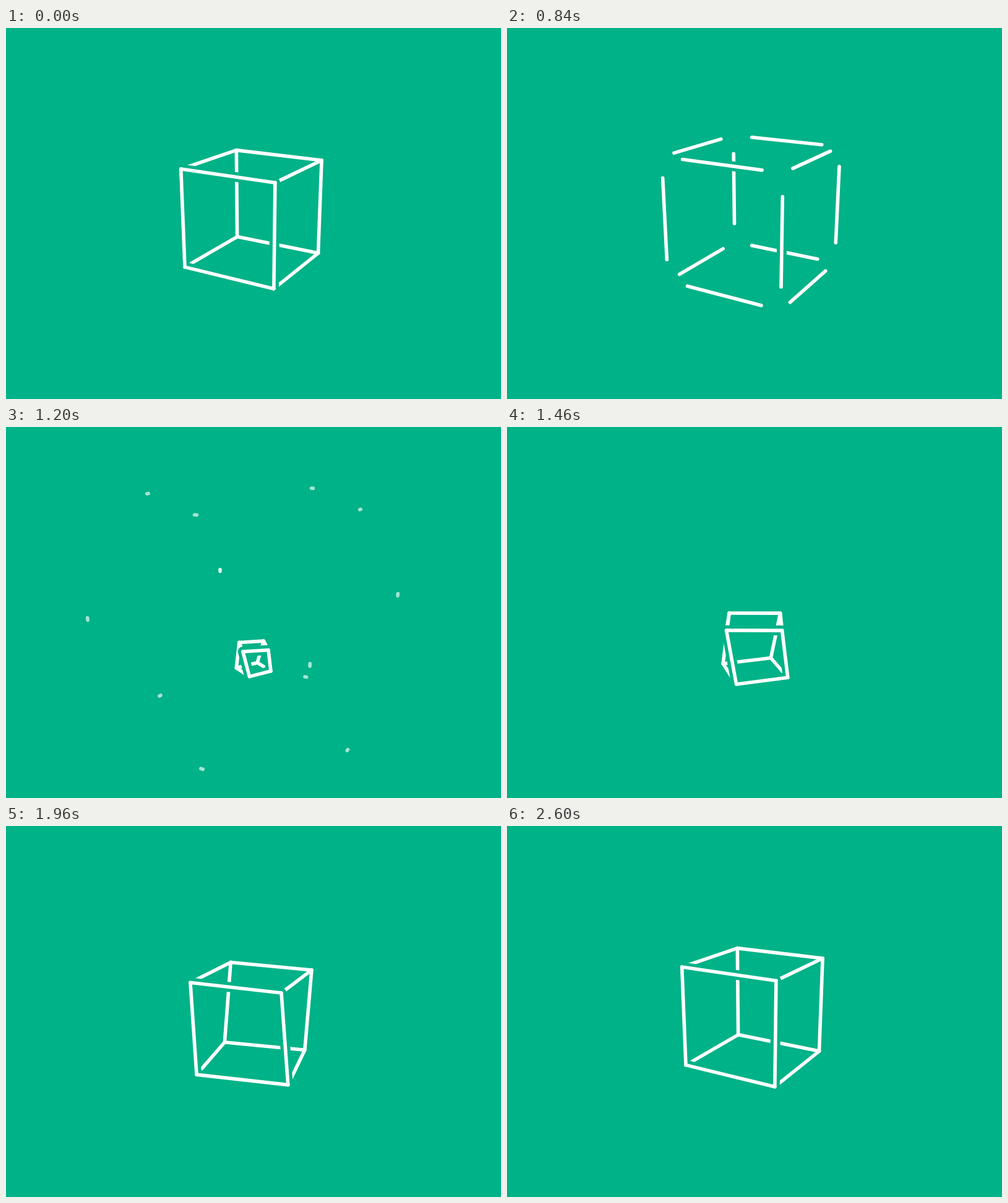
These frames come from a looping animation (800x600 px, 2.72 s). An HTML page with a canvas:

```html
<!DOCTYPE html>
<html lang="en">
<head>
<meta charset="utf-8">
<title>Cube burst</title>
<style>
  html, body { margin: 0; width: 100%; height: 100%; overflow: hidden; background: #00b287; }
  canvas { display: block; width: 800px; height: 600px; }
</style>
</head>
<body>
<canvas id="stage" width="800" height="600"></canvas>
<script>
const ctx = document.getElementById('stage').getContext('2d');
const LOOP = 2720, GREEN = '#00b287';
const HALF = 81, DEPTH = 930, TURN = 29.8, RAD = Math.PI / 180;
const TILT_COS = Math.cos(18 * RAD), TILT_SIN = Math.sin(18 * RAD);
const LINE = 5.6, HALO = 16;

// Corners: top face 0-3 from front left, bottom face 4-7 below them.
const CORNERS = [[-1, 1], [1, 1], [1, -1], [-1, -1]];
const BACK = [[3, 0], [1, 2], [2, 3], [2, 6], [3, 7], [7, 4], [5, 6], [6, 7]];
const FRONT = [[0, 1], [1, 5], [5, 4], [4, 0]];

const part = (t, from, to) => Math.min(1, Math.max(0, (t - from) / (to - from)));
const sineInOut = x => (1 - Math.cos(Math.PI * x)) / 2;
const sineOut = x => Math.sin(Math.PI * x / 2);

// Top and bottom faces have their own turn, which twists the cube.
function project(scale, topTurn, bottomTurn, drop) {
  const points = [];
  for (const [y, turn] of [[-1, topTurn], [1, bottomTurn]]) {
    const c = Math.cos(turn * RAD), s = Math.sin(turn * RAD), size = HALF * scale;
    for (const [x, z] of CORNERS) {
      const depth = x * s + z * c;
      const near = DEPTH / (DEPTH - size * (depth * TILT_COS - y * TILT_SIN));
      points.push([
        400 + size * (x * c - z * s) * near,
        300 + (size * (y * TILT_COS + depth * TILT_SIN) + drop) * near
      ]);
    }
  }
  return points;
}

// Keeps the middle share of an edge.
function segment(points, [i, j], share) {
  const a = points[i], b = points[j], k = (1 - share) / 2;
  const dx = (b[0] - a[0]) * k, dy = (b[1] - a[1]) * k;
  return [a[0] + dx, a[1] + dy, b[0] - dx, b[1] - dy];
}

function stroke([x1, y1, x2, y2], color, width) {
  ctx.strokeStyle = color;
  ctx.lineWidth = width;
  ctx.beginPath();
  ctx.moveTo(x1, y1);
  ctx.lineTo(x2, y2);
  ctx.stroke();
}

function drawCube(points, share = 1, alpha = 1) {
  const white = a => `rgba(255,255,255,${a})`;
  for (const edge of BACK) {
    const rear = edge[0] === 3 && edge[1] === 7;
    stroke(segment(points, edge, share), white(rear ? 1 - (1 - alpha) ** 2 : alpha), LINE);
  }
  const front = FRONT.map(edge => segment(points, edge, share));
  front.forEach(line => stroke(line, GREEN, HALO));
  front.forEach(line => stroke(line, white(alpha), LINE));
}

function draw(t) {
  ctx.fillStyle = GREEN;
  ctx.fillRect(0, 0, 800, 600);
  ctx.lineCap = 'round';

  if (t < 1240) {
    const spread = 1 + 1.245 * (Math.max(0, t - 600) / 600) ** 1.72;
    const share = 1 - 0.99 * sineInOut(part(t, 600, 1200));
    drawCube(project(spread, TURN, TURN, 0), share, 1 - part(t, 1180, 1240));
  }
  if (t > 980) {
    const left = 1 - sineInOut(part(t, 860, 2356));
    const lag = 1 - sineInOut(part(t, 735, 2480));
    const scale = sineOut(part(t, 980, 2350));
    drawCube(project(scale, TURN - 44.9 * left, TURN - 74.2 * lag, 83.7 * left));
  }
}

const start = performance.now();
function tick() {
  draw((performance.now() - start) % LOOP);
  requestAnimationFrame(tick);
}
tick();
</script>
</body>
</html>
```
